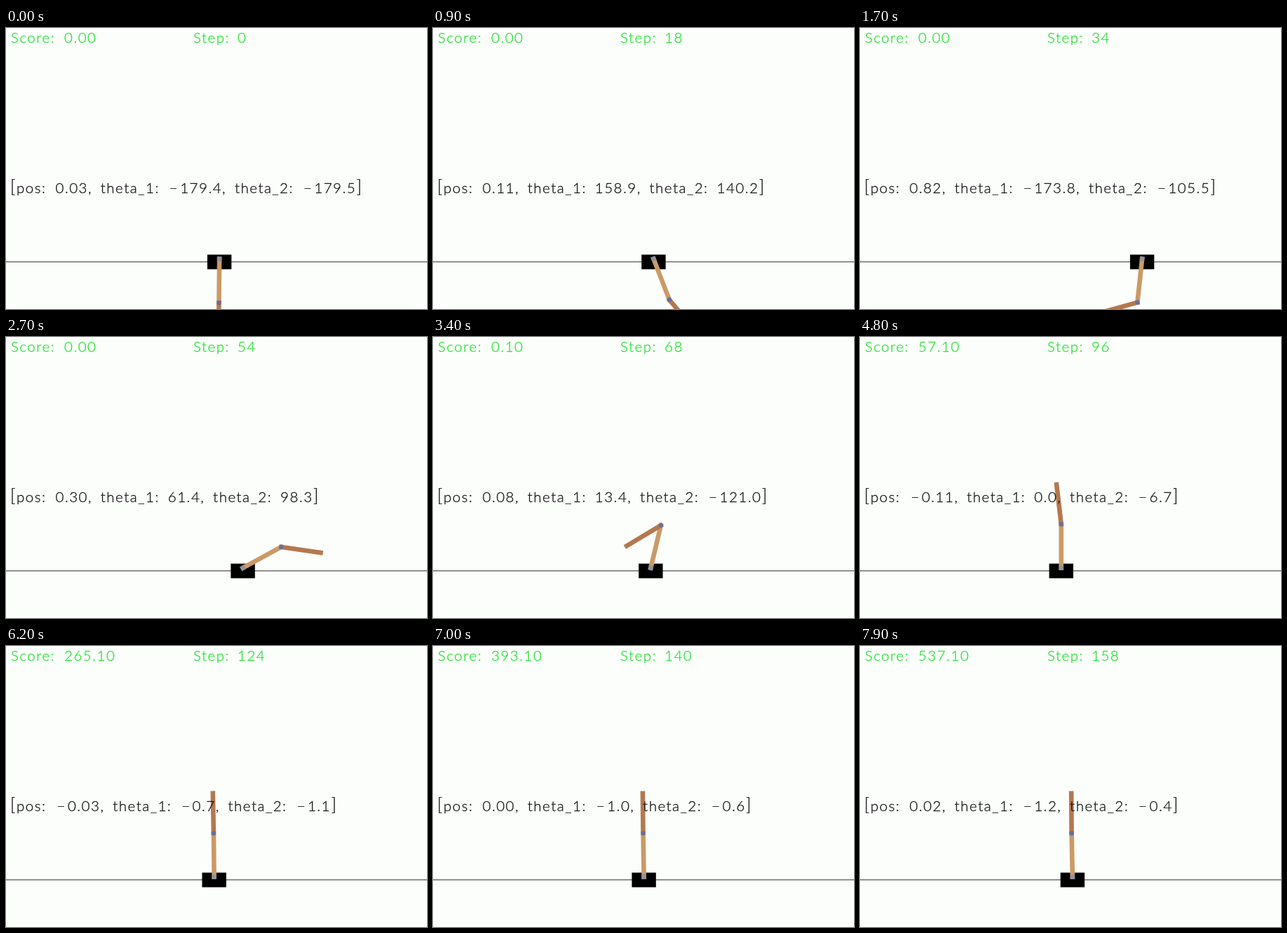
An HTML page with a canvas that plays this animation: 600x400 px, repeating every 8000 ms.

```html
<!DOCTYPE html>
<html lang="en">
<head>
<meta charset="utf-8">
<title>Double pendulum swing-up</title>
<style>
  html, body { margin: 0; width: 100%; height: 100%; overflow: hidden; background: #fcfefc; }
  canvas { display: block; }
</style>
</head>
<body>
<canvas id="stage" width="600" height="400"></canvas>
<script>
const ctx = document.getElementById('stage').getContext('2d');
const LOOP = 8000, FRAME = 100, STEP = 50;
const DIGIT = 13.4, DOT = 6.7, MINUS = 17.4, GAP = 17.4, LABEL = 96;
const PIVOT_Y = 328.7, ROD = 62.3, WINDUP = 1700;

// key poses: time, cart position, unwrapped rod angles in degrees from upright
const POSES = [
  [0, .03, -179.4, -179.5],
  [WINDUP, .82, -173.8, -105.5],
  [2700, .3, -298.6, 98.3],
  [3400, .08, -346.6, 239],
  [4100, 0, -356, 341],
  [4800, -.11, -360, 353.3],
  [6200, -.03, -360.7, 358.9],
  [7900, .02, -361.2, 359.6]
];

function secant(i, c) {
  const a = POSES[i], b = POSES[i + 1];
  return a && b ? (b[c] - a[c]) / (b[0] - a[0]) : 0;
}

// harmonic mean of the neighbouring secants: smooth without overshoot
function slope(i, c) {
  const p = secant(i - 1, c), q = secant(i, c);
  return p * q > 0 ? 2 * p * q / (p + q) : 0;
}

function glide(t, c) {
  let i = 0;
  while (i < POSES.length - 2 && POSES[i + 1][0] <= t) i++;
  const a = POSES[i], b = POSES[i + 1], h = b[0] - a[0], u = (t - a[0]) / h;
  return a[c] + (b[c] - a[c]) * u * u * (3 - 2 * u)
    + h * u * (1 - u) * ((1 - u) * slope(i, c) - u * slope(i + 1, c));
}

// the cart first holds back while the rods swing to the right
function poseAt(t) {
  const back = t < WINDUP ? Math.sin(Math.PI * t / WINDUP) ** 2 : 0;
  return [glide(t, 1) - .35 * back, glide(t, 2) - 25 * back, glide(t, 3) - 65 * back];
}

const wrap = a => a - 360 * Math.round(a / 360);
const clamp = (v, max) => Math.max(0, Math.min(max, v));

// reward per step grows from 1 to 4 to 8 once the rods stand up
function scoreAt(step) {
  const base = step >= 66 ? .1 : 0;
  return base + clamp(step - 81, 1) + 4 * clamp(step - 82, 18) + 8 * Math.max(0, step - 100);
}

function rect(color, x, y, w, h) {
  ctx.fillStyle = color;
  ctx.fillRect(x, y, w, h);
}

function rod(x, y, angle, color, start, end) {
  ctx.save();
  ctx.translate(x, y);
  ctx.rotate(angle * Math.PI / 180);
  rect(color, -3.3, -end, 6.6, end - start);
  ctx.restore();
}

function setFont(size, color) {
  ctx.font = `300 ${size}px Lato, sans-serif`;
  ctx.letterSpacing = '0px';
  ctx.letterSpacing = DIGIT - ctx.measureText('0').width + 'px';
  ctx.fillStyle = ctx.strokeStyle = color;
  ctx.lineWidth = .3;
}

function write(text, x, y) {
  ctx.fillText(text, x, y);
  ctx.strokeText(text, x, y);
}

// writes a signed number and returns its advance
function number(value, digits, x, y, tail = '') {
  const text = value.toFixed(digits), negative = text[0] === '-';
  const body = negative ? text.slice(1) : text;
  const lead = negative ? MINUS : 0;
  if (negative) write('−', x + 2, y);
  write(body + tail, x + lead, y);
  return lead + (body.length - 1) * DIGIT + DOT;
}

function drawText(step, pos, a1, a2) {
  setFont(20.5, '#22e02e');
  write('Score:', 7, 20.5);
  number(scoreAt(step), 2, 83, 20.5);
  write('Step:', 267, 20.5);
  write(step, 330, 20.5);

  setFont(20.5, '#111');
  const y = 234.5;
  write('pos:', 15, y);
  let x = 70.5;
  x += number(pos, 2, x, y, ',') + GAP;
  write('theta_1:', x, y);
  x += LABEL;
  x += number(a1, 1, x, y, ',') + GAP;
  write('theta_2:', x, y);
  x += LABEL;
  x += number(a2, 1, x, y);
  setFont(25, '#111');
  write('[', 6, y);
  write(']', x, y);
}

function draw(t) {
  const [pos, a1, a2] = poseAt(t);
  const x = 300.4 + 124 * pos, rad = a1 * Math.PI / 180;
  const jx = x + ROD * Math.sin(rad), jy = PIVOT_Y - ROD * Math.cos(rad);

  rect('#fcfefc', 0, 0, 600, 400);
  rect('#777', 0, 332, 600, 1.6);
  rect('#000', x - 17.2, 322.6, 34.4, 20.8);
  rod(x, PIVOT_Y, a1, '#ca9a66', -3, ROD + 3);
  rod(jx, jy, a2, '#b4784e', -3, 60);
  rod(x, PIVOT_Y, a1, '#92929c', -3.3, 3.3);
  ctx.fillStyle = '#6c6e98';
  ctx.beginPath();
  ctx.arc(jx, jy, 3.2, 0, 2 * Math.PI);
  ctx.fill();

  drawText(t / STEP, pos, wrap(a1), wrap(a2));
}

const begin = performance.now();
function tick() {
  const t = (performance.now() - begin) % LOOP;
  draw(Math.floor(t / FRAME) * FRAME);
  requestAnimationFrame(tick);
}
tick();
</script>
</body>
</html>
```
